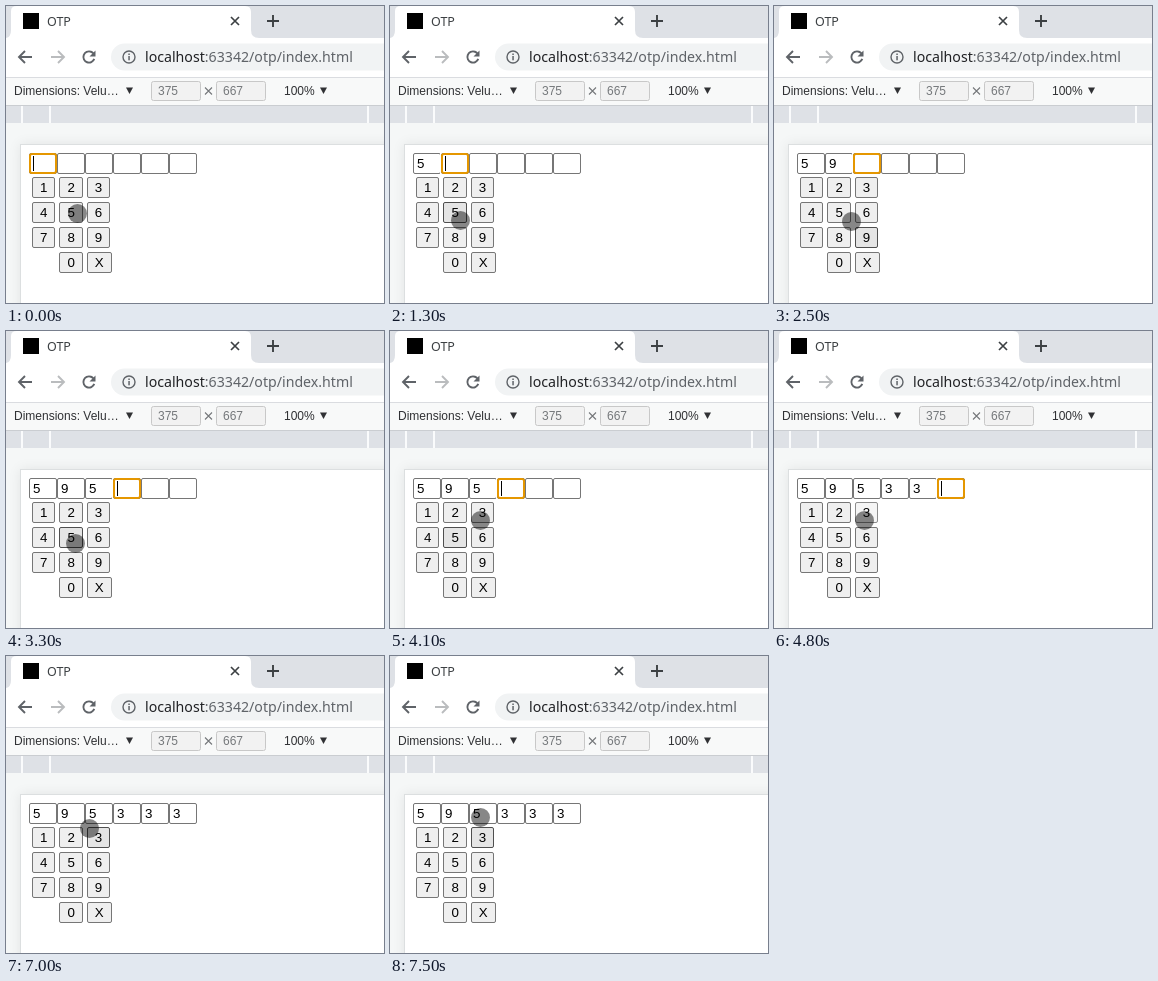
An HTML page with a canvas that plays this animation: 378x297 px, repeating every 8000 ms.

```html
<!DOCTYPE html>
<html lang="en">
<head>
<meta charset="utf-8">
<title>OTP</title>
<style>
  html, body { margin: 0; width: 100%; height: 100%; overflow: hidden; background: #fff; }
  canvas { display: block; }
</style>
</head>
<body>
<canvas id="stage" width="378" height="297"></canvas>
<script>
const ctx = document.getElementById('stage').getContext('2d');
const LOOP = 8000, STEP = 100, BLINK = 500;
const BAR_FONT = '12px "Liberation Sans", Arial, sans-serif';
const URL_FONT = '14.16px "Noto Sans", sans-serif';
const TAB_FONT = '12.5px "Noto Sans", sans-serif';
const PAGE_FONT = '13.333px "Liberation Sans", Arial, sans-serif';

// Each tap: key, touch start, digit entered, touch end.
const taps = [
  { key: '5', down: 900, typed: 1000, up: 1300 },
  { key: '9', down: 1900, typed: 2000, up: 2200 },
  { key: '5', down: 3000, typed: 3100, up: 3300 },
  { key: '3', down: 4300, typed: 4300, up: 4500 },
  { key: '3', down: 4800, typed: 4800, up: 4900 },
  { key: '3', down: 6200, typed: 6200, up: 6400 }
];

// Pointer moves: one position per step, the last one is held.
const moves = [
  { at: 0, path: [[71, 207]] },
  { at: 200, path: [[70, 205], [69, 204], [68, 205], [68, 206]] },
  { at: 1300, path: [[70, 214], [86, 227], [97, 233]] },
  { at: 2400, path: [[91, 227], [77, 215], [71, 212], [69, 212]] },
  { at: 3500, path: [[72, 208], [78, 202], [84, 195], [89, 190], [90, 189]] },
  { at: 7000, path: [[83, 172], [82, 157], [84, 151], [88, 152], [91, 157], [90, 161]] }
];

const keys = [...'123456789'].map((label, i) => ({ label, col: i % 3, row: Math.floor(i / 3) }));
keys.push({ label: '0', col: 1, row: 3 }, { label: 'X', col: 2, row: 3 });

const keyColors = {
  idle: ['#efefef', '#767676'],
  hover: ['#e5e5e5', '#4f4f4f'],
  active: ['#f5f5f5', '#8d8d8d']
};

function rect(x, y, w, h, color) {
  ctx.fillStyle = color;
  ctx.fillRect(x, y, w, h);
}

function box(x, y, w, h, radius, fill, stroke, width = 1) {
  const half = width / 2;
  ctx.beginPath();
  ctx.roundRect(x + half, y + half, w - width, h - width, radius);
  if (fill) { ctx.fillStyle = fill; ctx.fill(); }
  if (stroke) { ctx.strokeStyle = stroke; ctx.lineWidth = width; ctx.stroke(); }
}

function text(str, x, y, font, color) {
  ctx.font = font;
  ctx.fillStyle = color;
  ctx.fillText(str, x, y);
  return ctx.measureText(str).width;
}

function lines(color, width, ...paths) {
  ctx.strokeStyle = color;
  ctx.lineWidth = width;
  ctx.beginPath();
  for (const path of paths) path.forEach(([x, y], i) => i ? ctx.lineTo(x, y) : ctx.moveTo(x, y));
  ctx.stroke();
}

function triangle(color, ...points) {
  ctx.fillStyle = color;
  ctx.beginPath();
  points.forEach(([x, y]) => ctx.lineTo(x, y));
  ctx.fill();
}

function arc(x, y, r, from, to, color, width) {
  ctx.strokeStyle = color;
  ctx.lineWidth = width;
  ctx.beginPath();
  ctx.arc(x, y, r, from, to);
  ctx.stroke();
}

function drawTabs() {
  rect(0, 0, 378, 32, '#dee1e6');
  ctx.fillStyle = '#fff';
  ctx.beginPath();
  ctx.moveTo(0, 32);
  ctx.quadraticCurveTo(5, 31, 5, 24);
  ctx.lineTo(5, 5);
  ctx.quadraticCurveTo(5, 0, 11, 0);
  ctx.lineTo(239, 0);
  ctx.quadraticCurveTo(245, 0, 245, 6);
  ctx.lineTo(245, 24);
  ctx.quadraticCurveTo(245, 32, 253, 32);
  ctx.fill();
  rect(17, 7, 16, 16, '#000');
  text('OTP', 41, 20, TAB_FONT, '#3c4043');
  lines('#3c4043', 1.7, [[225, 11], [233, 19]], [[233, 11], [225, 19]]);
  lines('#3c4043', 1.9, [[261, 15], [273, 15]], [[267, 9], [267, 21]]);
}

function drawToolbar() {
  rect(0, 32, 378, 39, '#fff');
  lines('#5f6368', 1.9, [[26, 51], [13, 51]], [[19, 45], [13, 51], [19, 57]]);
  lines('#babcbe', 1.9, [[45, 51], [58, 51]], [[52, 45], [58, 51], [52, 57]]);
  arc(83, 51, 5.6, 0.35, Math.PI * 1.78, '#5f6368', 1.9);
  triangle('#5f6368', [89.5, 44.5], [89.5, 50.5], [83.5, 50.5]);

  box(104.5, 37, 300, 28, 14, '#f1f3f4');
  arc(123, 51, 6, 0, Math.PI * 2, '#5f6368', 1.4);
  rect(122.3, 50, 1.5, 4.3, '#5f6368');
  rect(122.3, 47.5, 1.5, 1.5, '#5f6368');
  const hostWidth = text('localhost', 139, 56, URL_FONT, '#202124');
  text(':63342/otp/index.html', 139 + hostWidth, 56, URL_FONT, '#5f6368');
}

function drawDeviceBar() {
  rect(0, 71, 378, 28, '#f8f9f9');
  rect(0, 71, 378, 1, '#dadce0');
  text('Dimensions: Velu…', 8, 89, BAR_FONT, '#303134');
  text('100%', 278, 89, BAR_FONT, '#303134');
  for (const x of [123.5, 317.5]) triangle('#303134', [x - 3.5, 81.5], [x + 3.5, 81.5], [x, 88]);
  [['375', 145], ['667', 210]].forEach(([size, x]) => {
    box(x, 75, 50, 20, 2, '#f2f2f2', '#c8c8c8');
    text(size, x + 7, 89, BAR_FONT, '#75787b');
  });
  lines('#75787b', 1.1, [[199, 81.5], [206, 88.5]], [[206, 81.5], [199, 88.5]]);

  rect(0, 99, 378, 1, '#cacdd1');
  rect(0, 100, 378, 17, '#dee1e6');
  for (const x of [15, 43, 361]) rect(x, 100, 2, 17, '#fafbfc');
}

function drawPage() {
  rect(0, 117, 378, 180, '#f5f7f7');
  ctx.shadowColor = 'rgba(0, 0, 0, 0.08)';
  ctx.shadowBlur = 12;
  rect(14, 138, 380, 180, '#dcdfe0');
  ctx.shadowColor = 'transparent';
  rect(15, 139, 363, 158, '#fff');
}

function drawFields(time, entered) {
  for (let i = 0; i < taps.length; i++) {
    const x = 23 + 28 * i;
    box(x, 147, 28, 21, 1.5, '#fff', '#767676');
    if (i < entered) text(taps[i].key, x + 4, 162, PAGE_FONT, '#000');
  }
  if (entered === taps.length) return;
  const x = 23 + 28 * entered;
  rect(x - 1, 147, 1, 21, '#fff');
  box(x, 147, 28, 21, 2, '#fff', '#e59700', 2);
  const focused = entered ? taps[entered - 1].typed : 0;
  if (Math.floor((time - focused) / BLINK) % 2 === 0) rect(x + 4, 150, 1, 15, '#000');
}

function drawKeys(time) {
  const tap = taps.findLast(({ down }) => time >= down);
  for (const { label, col, row } of keys) {
    const left = 26 + 27.41 * col, y = 171 + 25 * row;
    const x = Math.round(left);
    const right = Math.round(left + (label === 'X' ? 24.9 : 23.41));
    const touched = tap && tap.key === label;
    const state = !touched ? 'idle' : time < tap.up ? 'active' : 'hover';
    box(x, y, right - x, 21, 1.5, ...keyColors[state]);
    text(label, left + 8, y + 15, PAGE_FONT, '#000');
  }
}

function drawPointer(time) {
  const { at, path } = moves.findLast(move => time >= move.at);
  const [x, y] = path[Math.min(path.length - 1, (time - at) / STEP)];
  ctx.fillStyle = 'rgba(0, 0, 0, 0.47)';
  ctx.beginPath();
  ctx.arc(x + 0.5, y + 0.5, 9.5, 0, Math.PI * 2);
  ctx.fill();
}

function draw() {
  const time = Math.floor((performance.now() % LOOP) / STEP) * STEP;
  const entered = taps.filter(({ typed }) => time >= typed).length;
  drawTabs();
  drawToolbar();
  drawDeviceBar();
  drawPage();
  drawFields(time, entered);
  drawKeys(time);
  drawPointer(time);
  requestAnimationFrame(draw);
}

draw();
</script>
</body>
</html>
```
